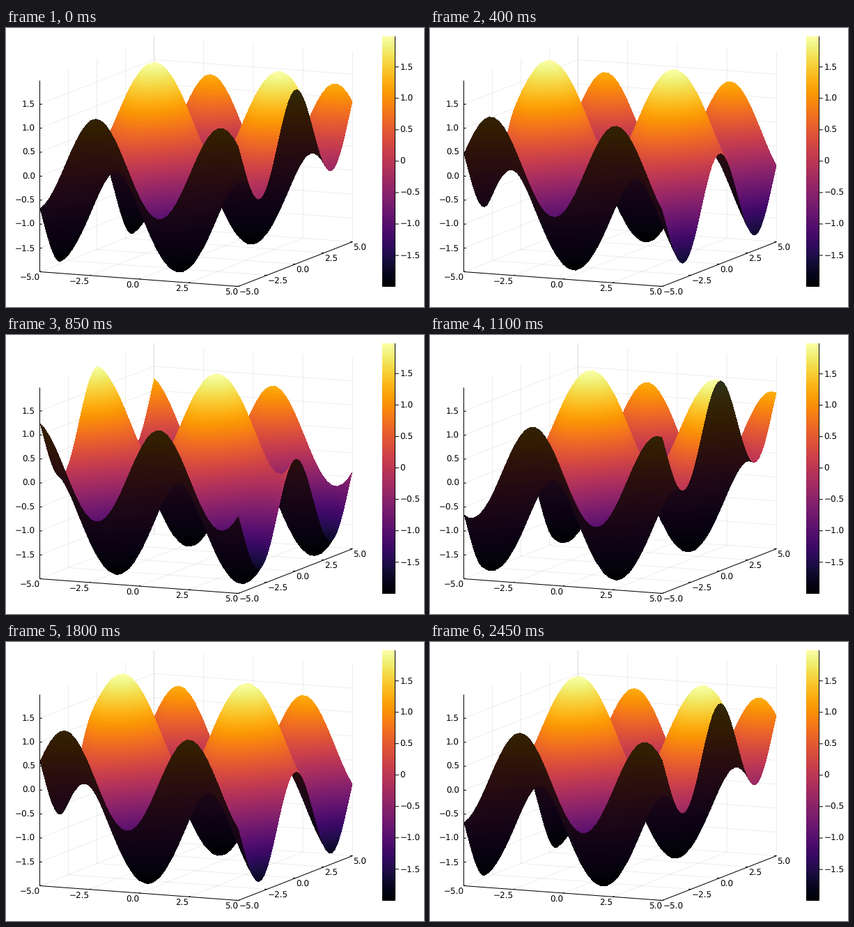
Write a matplotlib script that moves like this. It is 600 px wide and 400 px high and loops after 2500 ms.

```python
import numpy as np
import matplotlib
import matplotlib.pyplot as plt
from matplotlib.animation import FuncAnimation

W, H, DPI = 600, 400, 100
FRAMES, INTERVAL = 50, 50
PX = 72 / DPI                      # one pixel in points

plt.rcParams["font.family"] = "DejaVu Sans"
plt.rcParams["text.hinting"] = "no_hinting"

# Affine view of the box: front-left corner, full x edge, full y edge, height.
CORNER = np.array([48.5, 349.5])
EDGE_X = np.array([285.0, 21.0])
EDGE_Y = np.array([164.0, -64.0])
HEIGHT = 274.0
BAR = (540, 558, 12, 371)          # left, right, top, bottom


def project(x, y, lift=0.0):
    """Screen point of data position (x, y), raised by lift pixels."""
    u, v = (x + 5) / 10, (y + 5) / 10
    return (CORNER[0] + u * EDGE_X[0] + v * EDGE_Y[0],
            CORNER[1] + u * EDGE_X[1] + v * EDGE_Y[1] - lift)


fig = plt.figure(figsize=(W / DPI, H / DPI), dpi=DPI, facecolor="white")
ax = fig.add_axes([0, 0, 1, 1])
ax.axis("off")


def line(points, grid=False):
    style = dict(alpha=0.08, lw=0.9 * PX) if grid else dict(lw=PX)
    xs, ys = zip(*points)
    return ax.plot(xs, ys, color="black", zorder=1 if grid else 3, snap=False,
                   solid_capstyle="butt", **style)[0]


def label(x, y, text, ha):
    return ax.text(x, y, text, ha=ha, va="baseline", fontsize=12 * PX, zorder=4)


def number(v, digits=1):
    return f"{v:.{digits}f}".replace("-", "\u2212")


# Fixed grid, axes and floor labels
for t in np.arange(-5, 5.1, 2.5):
    line([project(t, -5), project(t, 5)], grid=True)
    line([project(t, 5), project(t, 5, HEIGHT)], grid=True)
    line([project(-5, t), project(5, t)], grid=True)
    line([project(-5, t), project(-5, t, HEIGHT)], grid=True)

    line([project(t, -5), project(t, -4.88)])
    line([project(5, t), project(4.88, t)])
    px, py = project(t, -5)
    label(px, py + 12.8, number(t), "right")
    px, py = project(5, t)
    label(px + 0.8, py + 12.8, number(t), "left")

line([project(-5, -5), project(5, -5)])
line([project(5, -5), project(5, 5)])
line([project(-5, -5), project(-5, -5, HEIGHT)])

# Colour bar
left, right, top, bottom = BAR
ax.imshow(np.linspace(1, 0, 256)[:, None], cmap="inferno", aspect="auto",
          extent=(left, right, bottom, top), interpolation="nearest", zorder=2)
line([(right + 0.5, top), (right + 0.5, bottom)])

# Parts that follow the height range
TICKS = np.arange(-1.5, 1.6, 0.5)
walls = [line([(0, 0)] * 3, grid=True) for _ in TICKS]
z_marks = [line([(0, 0)] * 2) for _ in TICKS]
z_labels = [label(42, 0, number(t), "right") for t in TICKS]
bar_marks = [line([(0, 0)] * 2) for _ in TICKS]
bar_labels = [label(565.7, 0, number(t) if t else "0", "left") for t in TICKS]

# Surface mesh and its colours: 256 lit, 256 for the dark underside, one clear
knots = np.linspace(-5, 5, 40)
cos_y = np.cos(knots)
knot_x, knot_y = project(knots[None, :], knots[:, None])
lit = matplotlib.colormaps["inferno"](np.arange(256))
under = lit * [0.2, 0.2, 0.2, 1]
palette = (np.vstack([lit, under, [[1, 1, 1, 0]]]) * 255).round().astype(np.uint8)
CLEAR = 512

surface = ax.imshow(np.zeros((H, W, 4), np.uint8), extent=(0, W, H, 0),
                    interpolation="nearest", aspect="auto", zorder=2)
ax.set_xlim(0, W)
ax.set_ylim(H, 0)

pixel_x = np.arange(W)[None, :] + 0.5
pixel_y = np.arange(H)[:, None] + 0.5
ux, vx = EDGE_X[0] / 39, EDGE_Y[0] / 39


def paint(sin_x, low, high):
    """Fill the mesh cells, which are flat parallelograms, from back to front."""
    level = (cos_y[:, None] + sin_x[None, :] - low) / (high - low)
    ys = knot_y - level * HEIGHT
    canvas = np.full((H, W), CLEAR, np.int16)
    shades = level * 255
    for j in range(38, -1, -1):
        for i in range(39):
            x0, y0 = float(knot_x[j, i]), float(ys[j, i])
            uy, vy = float(ys[j, i + 1]) - y0, float(ys[j + 1, i]) - y0
            det = ux * vy - uy * vx
            if abs(det) < 1e-6:
                continue
            reach = (y0, y0 + uy, y0 + vy, y0 + uy + vy)
            rows = slice(max(int(min(reach)), 0), int(max(reach)) + 1)
            cols = slice(int(x0), int(x0 + ux + vx) + 1)
            dx, dy = pixel_x[:, cols] - x0, pixel_y[rows] - y0
            a = (dx * vy - dy * vx) / det
            b = (dy * ux - dx * uy) / det
            inside = (np.abs(a - 0.5) <= 0.5) & (np.abs(b - 0.5) <= 0.5)
            s = shades[j, i]
            shade = s + a * (shades[j, i + 1] - s) + b * (shades[j + 1, i] - s)
            # The winding on screen tells which side is seen
            shade += 256.5 if det > 0 else 0.5
            np.copyto(canvas[rows, cols], shade, where=inside, casting="unsafe")
    return palette[canvas]


painted = {}


def update(n):
    phase = 10 * np.cos(2 * np.pi * n / (FRAMES - 1))
    sin_x = np.sin(knots + phase)
    low = sin_x.min() + cos_y.min()
    high = sin_x.max() + cos_y.max()

    # The second half mirrors the first, so its pictures are reused
    key = min(n, FRAMES - 1 - n)
    if key not in painted:
        painted[key] = paint(sin_x, low, high)
    surface.set_data(painted[key])

    for i, t in enumerate(TICKS):
        part = (t - low) / (high - low)
        lift = part * HEIGHT
        path = [project(-5, -5, lift), project(-5, 5, lift), project(5, 5, lift)]
        walls[i].set_data(*zip(*path))
        x, y = path[0]
        z_marks[i].set_data([x, x + 3.4], [y, y])
        z_labels[i].set_y(y + 4)
        y = bottom - 0.5 - part * (bottom - top)
        bar_marks[i].set_data([right, right + 6], [y, y])
        bar_labels[i].set_y(y + 4)
    return []


anim = FuncAnimation(fig, update, frames=FRAMES, interval=INTERVAL,
                     init_func=lambda: update(0), repeat=True, repeat_delay=0)
plt.show()
```
